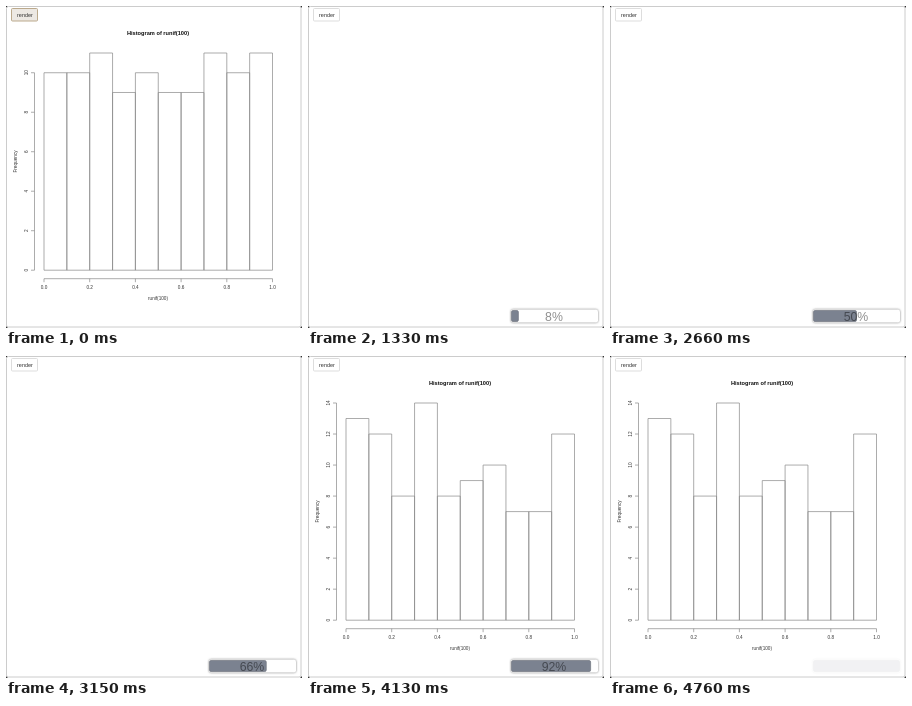
Write an HTML page that moves like this. It is 296x322 px and loops after 5.04 s.

```html
<!DOCTYPE html>
<html lang="en">
<head>
<meta charset="utf-8">
<title>Histogram render</title>
<style>
  html, body { margin: 0; width: 100%; height: 100%; overflow: hidden; background: #fff; }
  svg { display: block; font-family: "Liberation Sans", Arial, sans-serif; }
  .plot { font-size: 4.7px; fill: #333; text-anchor: middle; }
  .plot path { fill: none; stroke: #888; stroke-width: .7; }
  .plot .title { font-size: 5.65px; font-weight: bold; fill: #111; }
  #panel { filter: drop-shadow(0 0 1px #777); }
</style>
</head>
<body>
<svg width="296" height="322" viewBox="0 0 296 322">
  <rect width="296" height="322" fill="#fff"/>
  <path d="M0 0h2L0 2zM296 0h-2l2 2zM0 322h2l-2-2zM296 322h-2l2-2z" fill="#333"/>
  <rect x=".5" y=".5" width="294.5" height="320.5" rx="2" fill="#fff" stroke="#ccc"/>
  <rect id="button" x="5.5" y="2.5" width="26" height="12.5" rx="1"/>
  <text x="11" y="10.5" font-size="5.5" fill="#333">render</text>
  <g id="before" class="plot"></g>
  <g id="after" class="plot"></g>
  <g id="progress">
    <rect id="panel" x="203" y="303.5" width="87" height="13" rx="2" fill="#fff"/>
    <rect id="bar" x="203.5" y="304.5" height="11" rx="1.5" fill="#7b8290" stroke="#70757e" stroke-width=".7"/>
    <text id="label" x="246" y="315" font-size="12.3" text-anchor="middle" fill="#000" fill-opacity=".44"></text>
  </g>
</svg>
<script>
const LOOP = 5040, STEP = 70;
const $ = id => document.getElementById(id);
const clamp = (v, lo = 0, hi = 1) => Math.min(hi, Math.max(lo, v));
const show = (el, on) => el.setAttribute('visibility', on ? 'visible' : 'hidden');

function drawPlot(group, counts) {
  const left = 38, width = 228.5, base = 264.2;
  const max = Math.max(...counts), unit = 217.2 / max;
  const barWidth = width / counts.length, lastTick = Math.floor(max / 2) * 2;
  let path = '', labels = '';
  const vertical = (text, x, y) =>
    `<text transform="translate(${x} ${y}) rotate(-90)">${text}</text>`;

  counts.forEach((n, i) => {
    path += `M${left + i * barWidth} ${base}v${-n * unit}h${barWidth}v${n * unit}z`;
  });
  path += `M28.5 ${base}V${base - lastTick * unit}M${left} 272.7h${width}`;
  for (let n = 0; n <= lastTick; n += 2) {
    const y = base - n * unit;
    path += `M28.5 ${y}h-3.5`;
    labels += vertical(n, 22, y);
  }
  for (let i = 0; i <= 5; i++) {
    const x = left + i * width / 5;
    path += `M${x} 272.7v3.5`;
    labels += `<text x="${x}" y="283">${(i / 5).toFixed(1)}</text>`;
  }
  group.innerHTML = `<path d="${path}"/>${labels}
    <text class="title" x="152" y="29">Histogram of runif(100)</text>
    <text x="152" y="294">runif(100)</text>${vertical('Frequency', 11, 155.5)}`;
}

function render(time) {
  const t = Math.floor(time / STEP) * STEP;
  const pressed = t < 630;
  show($('before'), pressed);
  show($('after'), t >= 4130);
  $('button').setAttribute('fill', pressed ? '#ece8e3' : '#fff');
  $('button').setAttribute('stroke', pressed ? '#bba98c' : '#ddd');

  // The count pauses at 92% until the new plot arrives.
  const count = t < 4130 ? clamp((t - 1080) * .0316, 0, 92) : 92 + (t - 4130) * .0316;
  const percent = clamp(Math.ceil(count), 0, 100);
  const fadeIn = clamp((t - 770) / 280);
  const fadeOut = 1 - .9 * clamp((t - 4410) / 350);
  $('progress').setAttribute('opacity', fadeIn * fadeOut);
  $('bar').setAttribute('width', percent * .86);
  show($('bar'), percent > 0);
  $('label').textContent = percent + '%';
  show($('label'), t < 4760);
}

drawPlot($('before'), [10, 10, 11, 9, 10, 9, 9, 11, 10, 11]);
drawPlot($('after'), [13, 12, 8, 14, 8, 9, 10, 7, 7, 12]);

const start = performance.now();
function frame() {
  render((performance.now() - start) % LOOP);
  requestAnimationFrame(frame);
}
frame();
</script>
</body>
</html>
```
